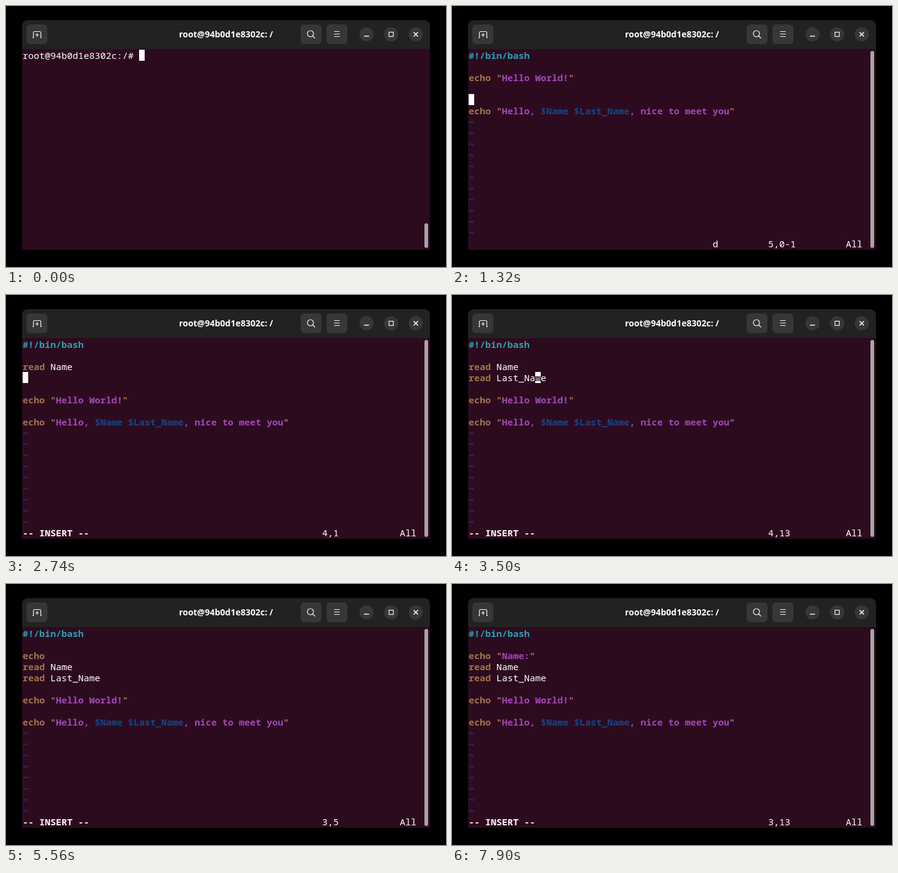
Recreate the animation shown at these times as an HTML page. Size 714x424 px, loop 8 s.

```html
<!DOCTYPE html>
<html lang="en">
<head>
<meta charset="utf-8">
<title>Terminal</title>
<style>
  html, body { margin: 0; width: 100%; height: 100%; overflow: hidden; background: #000; }
  svg { display: block; width: 100vw; height: 100vh; }
  text { white-space: pre; }
  #screen { font: 15px "Noto Sans Mono", "DejaVu Sans Mono", monospace; }
  #title { font: bold 14px "Noto Sans", "Open Sans", sans-serif; fill: #fff; text-anchor: middle; }
  .icon { fill: none; stroke: #f4f4f4; stroke-width: 1.2; }
  .button { fill: #373737; }
</style>
</head>
<body>
<svg viewBox="0 0 714 424">
  <path d="M26 396V34Q26 23 37 23H677Q688 23 688 34V396Z" fill="#2d0b1f"/>
  <path d="M26 70V34Q26 23 37 23H677Q688 23 688 34V70Z" fill="#222"/>
  <g class="button">
    <rect x="33" y="30" width="34" height="32" rx="6"/>
    <rect x="478" y="30" width="34" height="32" rx="6"/>
    <rect x="520" y="30" width="34" height="32" rx="6"/>
    <circle cx="585" cy="46" r="11.5"/>
    <circle cx="625" cy="46" r="11.5"/>
    <circle cx="665" cy="46" r="11.5"/>
  </g>
  <g class="icon">
    <path d="M43 51.5H44.5V43.5Q44.5 41.5 46.5 41.5H54.5Q56.5 41.5 56.5 43.5V51.5H58M50.5 44V50M47.5 47H53.5"/>
    <circle cx="494" cy="45" r="5"/>
    <path d="M497.5 48.5L501.5 52.5"/>
    <path d="M532.5 41.5H541.5M532.5 45.5H541.5M532.5 49.5H541.5"/>
    <path d="M581 49H589" stroke-width="1.5"/>
    <rect x="621.5" y="42.5" width="7" height="7"/>
    <path d="M661.5 42.5L668.5 49.5M668.5 42.5L661.5 49.5" stroke-width="1.7"/>
  </g>
  <text id="title" x="357" y="51"></text>
  <rect id="bar" x="679" width="6" rx="3" fill="#aaa2a6"/>
  <g id="screen"></g>
</svg>
<script>
const LOOP = 8000, BLINK = 150;
const CELL = 9, LINE = 18, LEFT = 27, TOP = 71;
const OPEN_AT = 820, ENTER_AT = 764;
const HOST = 'root@94b0d1e8302c';
const PROMPT = HOST + ':/# ';
const COMMAND = 'vim hello.sh';
const SCRIPT = [
  '#!/bin/bash', '', 'echo "Hello World!"', '',
  'Name="Foo"', 'Last_Name="Bar"', '',
  'echo "Hello, $Name $Last_Name, nice to meet you"'
];
const COLOR = {
  text: '#fff', cyan: '#2aa1b3', brown: '#a2734c',
  purple: '#a347ba', blue: '#12488b', back: '#2d0b1f'
};
const UNFOCUSED = [[6640, 6980], [7540, 7750]];

const type = (start, step, keys) => [...keys].map((key, i) => [start + i * step, key]);
const SHELL_KEYS = type(80, 57, COMMAND);
const KEYS = [
  ...type(940, 45, 'jjjj'),
  ...type(1140, 40, 'dddd'),
  [1312, 'd'], [1345, 'd'],
  [1450, 'k'], [1580, 'k'], [1720, 'k'],
  [1780, 'i'], [1860, '\n'], [1940, '\n'], [2020, '↑'],
  ...type(2100, 80, 'read Na'),
  [2620, 'm'], [2660, 'e'], [2720, '\n'],
  ...type(2780, 48, 'read Last_Name'),
  ...type(3440, 40, '←'.repeat(14)),
  [4020, '↑'], [4110, '↑'], [4540, '\n'],
  [5060, 'e'], [5180, 'c'], [5300, 'h'], [5410, 'o'], [5720, ' '],
  [6130, '"'],
  ...type(6980, 85, 'Name:'),
  [7750, '"']
];

const screen = document.getElementById('screen');
const bar = document.getElementById('bar');
document.getElementById('title').textContent = HOST + ': /';

// Replays the editor keys pressed up to time t.
function edit(t) {
  const ed = { lines: [...SCRIPT], row: 0, col: 0, insert: false, pending: '', last: OPEN_AT, touched: false };
  for (const [at, key] of KEYS) {
    if (at > t) break;
    ed.last = at;
    ed.touched = true;
    (ed.insert ? insertKey : normalKey)(ed, key);
  }
  return ed;
}

function normalKey(ed, key) {
  if (key === 'j') ed.row++;
  else if (key === 'k') ed.row--;
  else if (key === 'i') ed.insert = true;
  else if (ed.pending) {
    ed.lines.splice(ed.row, 1);
    ed.pending = '';
  } else ed.pending = key;
}

function insertKey(ed, key) {
  const line = ed.lines[ed.row];
  const head = line.slice(0, ed.col), tail = line.slice(ed.col);
  if (key === '←') ed.col--;
  else if (key === '↑') ed.row--;
  else if (key === '\n') {
    ed.lines.splice(ed.row, 1, head, tail);
    ed.row++;
    ed.col = 0;
  } else {
    ed.lines[ed.row] = head + key + tail;
    ed.col++;
  }
}

// Splits a line into [text, color] runs; "open" means a string began above.
function highlight(line, open) {
  if (line.startsWith('#!')) return [[line, 'cyan']];
  let quoted = open, pos = 0;
  return (line.match(/"|\$\w+|\w+|[^"$\w]+/g) || []).map(part => {
    pos += part.length;
    if (part === '"') {
      if (open) return [part, pos === line.length ? 'brown' : 'purple'];
      quoted = !quoted;
      return [part, 'brown'];
    }
    if (part[0] === '$') return [part, 'blue'];
    if (quoted) return [part, 'purple'];
    if (/^(echo|read)$/.test(part)) return [part, 'brown'];
    if (line[pos] === '=') return [part, 'cyan'];
    return [part, 'text'];
  });
}

const escapeXml = s => s.replace(/&/g, '&amp;').replace(/</g, '&lt;');

function put(row, col, str, color = 'text', bold = color !== 'text') {
  if (!str.trim()) return '';
  const weight = bold ? ' font-weight="bold"' : '';
  return `<text x="${LEFT + col * CELL}" y="${TOP + 15 + row * LINE}" fill="${COLOR[color]}"${weight}>${escapeXml(str)}</text>`;
}

function cursor(row, col, t, last, under = '') {
  const x = LEFT + col * CELL, y = TOP + row * LINE;
  if (UNFOCUSED.some(([from, to]) => t >= from && t < to))
    return `<rect x="${x + .5}" y="${y + .5}" width="${CELL + 1}" height="${LINE}" fill="none" stroke="#fff"/>`;
  if (Math.floor((t - last) / BLINK) % 2) return '';
  return `<rect x="${x}" y="${y}" width="${CELL}" height="${LINE}" fill="#fff"/>` + put(row, col, under, 'back', true);
}

function drawShell(t) {
  const typed = SHELL_KEYS.filter(([at]) => at <= t);
  const line = PROMPT + typed.map(k => k[1]).join('');
  const entered = t >= ENTER_AT;
  const last = typed.length ? typed[typed.length - 1][0] : 0;
  return put(0, 0, line) + (entered ? cursor(1, 0, t, ENTER_AT) : cursor(0, line.length, t, last));
}

function drawEditor(t) {
  const ed = edit(t);
  let out = '', open = false;
  ed.lines.forEach((line, row) => {
    let col = 0;
    for (const [str, color] of highlight(line, open)) {
      out += put(row, col, str, color);
      col += str.length;
    }
    if (line.split('"').length % 2 === 0) open = true;
  });
  for (let row = ed.lines.length; row < 17; row++) out += put(row, 0, '~', 'blue');

  const line = ed.lines[ed.row];
  const column = !ed.insert && !line ? '0-1' : ed.col + 1;
  if (ed.insert) out += put(17, 0, '-- INSERT --', 'text', true);
  else if (!ed.touched) out += put(17, 0, `"hello.sh" ${SCRIPT.length}L, ${SCRIPT.join('\n').length + 1}B`);
  out += put(17, 44, ed.pending);
  out += put(17, 54, `${ed.row + 1},${column}`);
  out += put(17, 68, 'All');
  return out + cursor(ed.row, ed.col, t, ed.last, line[ed.col]);
}

function draw(t) {
  const inEditor = t >= OPEN_AT;
  bar.setAttribute('y', inEditor ? 73 : 353);
  bar.setAttribute('height', inEditor ? 320 : 40);
  screen.innerHTML = inEditor ? drawEditor(t) : drawShell(t);
}

let start;
function tick(now) {
  start ??= now;
  draw((now - start) % LOOP);
  requestAnimationFrame(tick);
}
draw(0);
requestAnimationFrame(tick);
</script>
</body>
</html>
```
